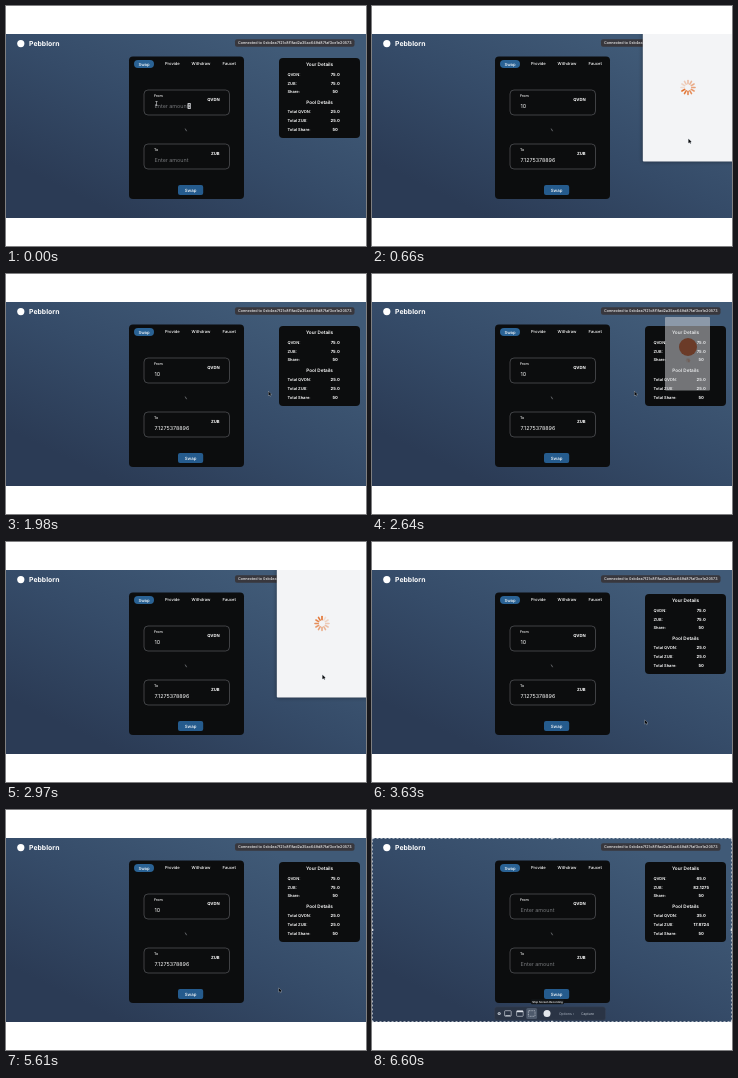
An HTML page with a canvas that plays this animation: 360 by 240 pixels, repeating every 6.93 s.

```html
<!DOCTYPE html>
<html lang="en">
<head>
<meta charset="utf-8">
<title>Pebblorn</title>
<style>
html, body { margin: 0; width: 100%; height: 100%; overflow: hidden; background: #fff; }
canvas { display: block; width: 360px; height: 240px; }
</style>
</head>
<body>
<canvas id="stage"></canvas>
<script>
const W = 360, H = 240, STEP = 330, LOOP = 6930;
const canvas = document.getElementById('stage');
const ctx = canvas.getContext('2d');
const dpr = window.devicePixelRatio || 1;
canvas.width = W * dpr;
canvas.height = H * dpr;
ctx.textRendering = 'geometricPrecision';

const TOKEN_A = 'QVDN', TOKEN_B = 'ZUB';
const WALLET = '0xb4ea7f21c8f1fad2a35ac649d87faf3ce1e20573';
const PANEL = '#0c0d0e';

function box(x, y, w, h, r, fill, stroke, line = 0.6) {
  ctx.beginPath();
  ctx.roundRect(x, y, w, h, r);
  if (fill) { ctx.fillStyle = fill; ctx.fill(); }
  if (stroke) { ctx.strokeStyle = stroke; ctx.lineWidth = line; ctx.stroke(); }
}

function dot(x, y, r, fill) {
  ctx.beginPath();
  ctx.arc(x, y, r, 0, Math.PI * 2);
  ctx.fillStyle = fill;
  ctx.fill();
}

// y is the middle of the capital letters
function text(str, x, y, size, weight = 500, align = 'left', color = '#fff') {
  ctx.font = `${weight} ${size}px Inter, Roboto, sans-serif`;
  ctx.textAlign = align;
  ctx.fillStyle = color;
  ctx.fillText(str, x, y + size * 0.36);
}

function backdrop() {
  ctx.fillStyle = '#fff';
  ctx.fillRect(0, 0, W, H);
  const g = ctx.createLinearGradient(130, 218, 225, 22);
  g.addColorStop(0, '#2b3b55');
  g.addColorStop(0.5, '#354b68');
  g.addColorStop(1, '#405a77');
  ctx.fillStyle = g;
  ctx.fillRect(0, 28, W, 184);
}

function header() {
  dot(14.8, 37.6, 3.6, '#fff');
  text('Pebblorn', 23, 38, 6.9, 700);
  box(229, 33.3, 119.5, 7.4, 2, '#38373d');
  text('Connected to ' + WALLET, 288.7, 37, 3.75, 500, 'center', '#f0f0f0');
}

function field(y, label, value, token) {
  box(138, y, 85.5, 25, 4, null, '#75777a', 0.5);
  text(label, 148, y + 6.2, 3.6, 500);
  text(value || 'Enter amount', 148.5, y + 15.8, 5.4, 400, 'left', value ? '#fff' : '#77797c');
  text(token, 213.6, y + 9.9, 4.2, 700, 'right');
}

function swapCard(filled) {
  box(123, 50.5, 115, 142.5, 4, PANEL);
  box(128, 54, 20, 8, 4, '#2a6294');
  text('Swap', 138, 58, 4.2, 500, 'center');
  text('Provide', 166.3, 58, 4.1, 500, 'center');
  text('Withdraw', 195, 58, 4.1, 500, 'center');
  text('Faucet', 223.2, 58, 4.1, 500, 'center');
  field(84, 'From', filled && '10', TOKEN_A);
  field(138, 'To', filled && '7.1275378896', TOKEN_B);
  ctx.beginPath();
  ctx.moveTo(179.2, 122.6);
  ctx.lineTo(180.6, 125.2);
  ctx.strokeStyle = '#8d9094';
  ctx.lineWidth = 0.7;
  ctx.stroke();
  box(172, 179, 25.2, 10, 2, '#255b8d');
  text('Swap', 184.6, 184, 4.4, 500, 'center');
}

function details(swapped) {
  const rows = (y, prefix, values) =>
    [TOKEN_A, TOKEN_B, 'Share'].forEach((name, i) => {
      const rowY = y + i * 8.7;
      text(prefix + name + ':', 281.5, rowY, 4, 600);
      text(values[i], 329.2, rowY, 4.2, 700, 'center');
    });
  box(273, 52, 81, 80, 4, PANEL);
  text('Your Details', 313.5, 58.5, 4.7, 600, 'center');
  rows(68.5, '', swapped ? ['65.0', '82.1275', '50'] : ['75.0', '75.0', '50']);
  text('Pool Details', 313.5, 96, 4.7, 600, 'center');
  rows(105.9, 'Total ', swapped ? ['35.0', '17.8724', '50'] : ['25.0', '25.0', '50']);
}

function spinner(x, y, inner, outer, width, rgb, turn) {
  ctx.lineCap = 'round';
  ctx.lineWidth = width;
  for (let i = 0; i < 12; i++) {
    const a = (i + turn) * Math.PI / 6;
    const c = Math.cos(a), s = Math.sin(a);
    ctx.strokeStyle = `rgba(${rgb}, ${0.18 + 0.82 * i / 11})`;
    ctx.beginPath();
    ctx.moveTo(x + c * inner, y + s * inner);
    ctx.lineTo(x + c * outer, y + s * outer);
    ctx.stroke();
  }
  ctx.lineCap = 'butt';
}

function popup(turn) {
  ctx.save();
  ctx.beginPath();
  ctx.rect(0, 28, W, 184);
  ctx.clip();
  ctx.shadowColor = 'rgba(0, 0, 0, 0.45)';
  ctx.shadowBlur = 4 * dpr;
  box(270.8, 26, 92, 129.5, 1, '#f3f4f6');
  ctx.restore();
  spinner(316, 81.5, 3.8, 7, 1.6, '226, 112, 45', turn);
}

function openingPopup() {
  box(293, 43, 45, 73.5, 1, 'rgba(210, 212, 215, 0.52)');
  dot(316, 73, 9, '#6b3b28');
  spinner(316, 86.5, 0.9, 1.9, 0.4, '110, 70, 50', 3);
}

function pointer(x, y) {
  ctx.beginPath();
  [[0, 0], [0, 4], [1, 3.2], [1.7, 4.6], [2.3, 4.3], [1.7, 3], [2.9, 2.8]]
    .forEach(([dx, dy]) => ctx.lineTo(x + dx - 1, y + dy - 2));
  ctx.closePath();
  ctx.strokeStyle = '#b4bac2';
  ctx.lineWidth = 0.7;
  ctx.stroke();
  ctx.fillStyle = '#08090b';
  ctx.fill();
}

function inputCursor() {
  ctx.fillStyle = '#d5d7da';
  ctx.fillRect(150.2, 95.2, 0.6, 4.6);
  ctx.fillRect(149.3, 95, 2.4, 0.5);
  ctx.fillRect(149.3, 99.5, 2.4, 0.5);
  box(181.6, 97, 3.2, 6, 0.6, '#c9cbce');
  ctx.fillStyle = '#222';
  for (const d of [-1, 1]) {
    ctx.beginPath();
    ctx.moveTo(182.2, 100 + d * 0.8);
    ctx.lineTo(184.2, 100 + d * 0.8);
    ctx.lineTo(183.2, 100 + d * 2.2);
    ctx.fill();
  }
}

function recorder() {
  ctx.setLineDash([2, 2]);
  ctx.strokeStyle = '#dfe3e8';
  ctx.lineWidth = 0.7;
  ctx.strokeRect(0.5, 28.5, 359, 183);
  ctx.setLineDash([]);
  for (const x of [0.5, 180, 359.5])
    for (const y of [28.5, 120, 211.5])
      if (x !== 180 || y !== 120) dot(x, y, 1, '#dfe3e8');

  box(159, 189.3, 33, 5, 1, '#111417');
  text('Stop Screen Recording', 175.5, 191.8, 2.8, 500, 'center');

  box(122.5, 196.8, 111, 13.4, 2.5, '#2a3445', '#3b4658', 0.4);
  dot(127.2, 203.5, 1.6, '#b9c0ca');
  ctx.strokeStyle = '#2a3445';
  ctx.beginPath();
  ctx.moveTo(126.5, 202.8); ctx.lineTo(127.9, 204.2);
  ctx.moveTo(127.9, 202.8); ctx.lineTo(126.5, 204.2);
  ctx.stroke();

  box(154.3, 198, 10.8, 11, 1.5, '#4d596b');
  box(132.6, 200.7, 6.6, 5.6, 0.8, null, '#dce1e7');
  box(144.6, 200.7, 6.6, 5.6, 0.8, null, '#dce1e7');
  ctx.fillStyle = '#dce1e7';
  ctx.fillRect(133.4, 205, 5, 0.7);
  ctx.fillRect(144.8, 200.8, 6.2, 1.4);
  ctx.setLineDash([1, 0.7]);
  box(156.4, 200.7, 6.6, 5.6, 0.5, null, '#dce1e7');
  ctx.setLineDash([]);
  dot(175, 203.5, 3.5, '#e3e7ec');
  text('Options ›', 194.5, 203.5, 3.5, 400, 'center', '#a9b3c1');
  text('Capture', 215.5, 203.5, 3.5, 400, 'center', '#b9c1cc');
}

const POINTER = [
  [330, 184, 186], [660, 317.5, 135], [1320, 318, 131],
  [1650, 263.5, 119.5], [2970, 317.5, 135], [3630, 273.8, 180]
];

function draw(now) {
  const t = Math.floor((now % LOOP) / STEP) * STEP;
  const between = (a, b) => t >= a && t < b;
  const swapped = t >= 5940;

  ctx.setTransform(dpr, 0, 0, dpr, 0, 0);
  backdrop();
  header();
  swapCard(between(330, 5940));
  details(swapped);
  if (between(660, 1320) || between(2970, 3630)) popup(6 + (t / STEP - 2) * 4);
  if (between(2640, 2970)) openingPopup();

  if (t < 330) inputCursor();
  const place = POINTER.filter(p => p[0] <= t).pop();
  if (place && !swapped) pointer(place[1], place[2]);
  if (t >= 6600) recorder();
}

const start = performance.now();
function tick() {
  draw(performance.now() - start);
  requestAnimationFrame(tick);
}
tick();
</script>
</body>
</html>
```
